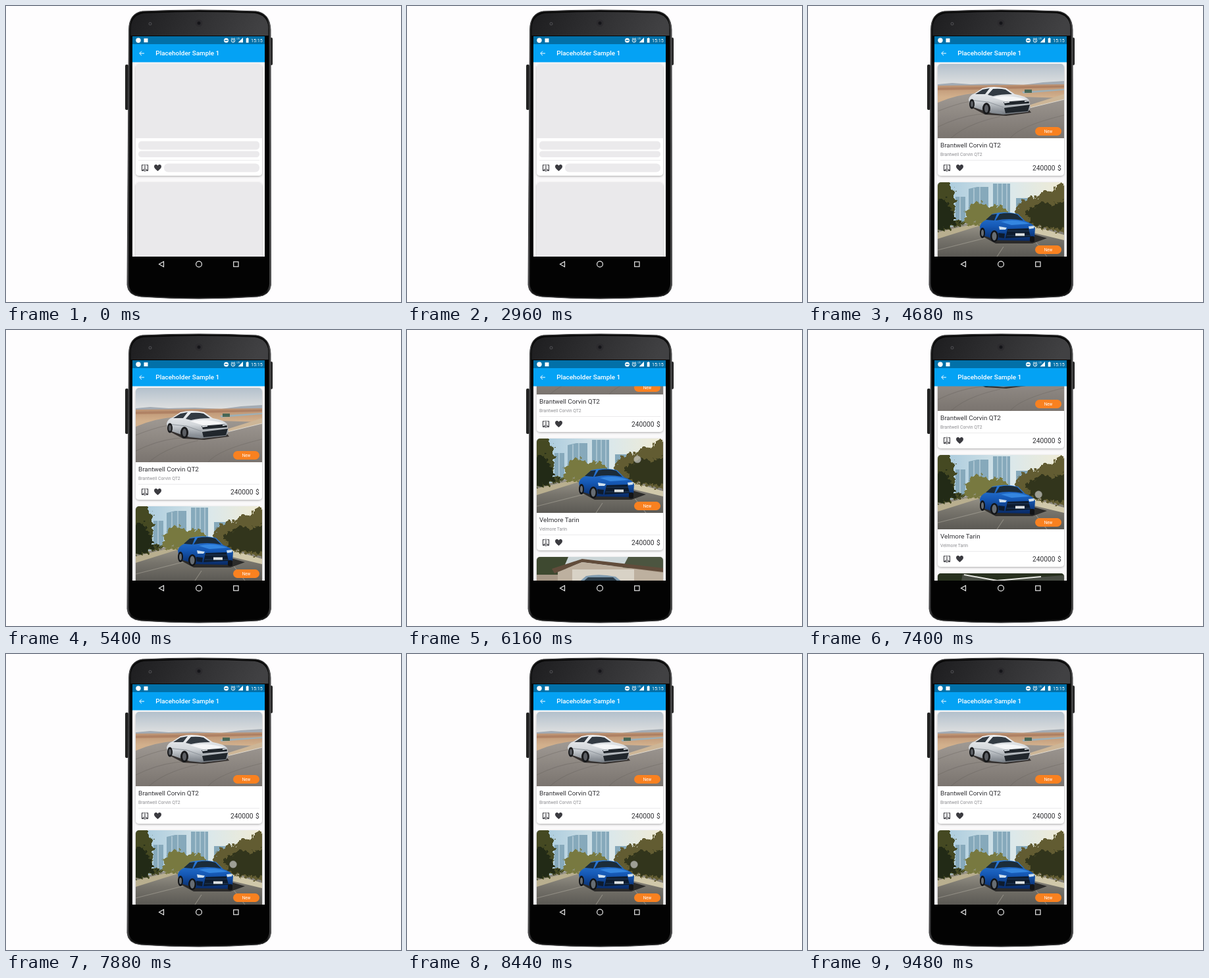
Recreate the animation shown at these times as an HTML page. Size 600 px wide and 450 px high, loop 9.52 s.

```html
<!DOCTYPE html>
<html lang="en">
<head>
<meta charset="utf-8">
<title>Placeholder list</title>
<style>
  html, body { margin: 0; width: 100%; height: 100%; overflow: hidden; background: #fefdfe; }
  svg { display: block; width: 100%; height: 100%; }
  text { font-family: Roboto, sans-serif; }
</style>
</head>
<body>
<svg viewBox="0 0 600 450">
  <defs>
    <linearGradient id="sky" x2="0" y2="1"><stop stop-color="#b3c0cc"/><stop offset="1" stop-color="#e4e4e3"/></linearGradient>
    <linearGradient id="desert" x2="0" y2="1"><stop stop-color="#b98f70"/><stop offset=".5" stop-color="#d2b08c"/></linearGradient>
    <linearGradient id="track" x2="0" y2="1"><stop stop-color="#a09a94"/><stop offset="1" stop-color="#7a746f"/></linearGradient>
    <linearGradient id="silver" x2="0" y2="1"><stop stop-color="#f0f2f4"/><stop offset=".5" stop-color="#d3d7db"/><stop offset="1" stop-color="#747a81"/></linearGradient>
    <linearGradient id="citySky" x2="1" y2="0"><stop stop-color="#a5c8dc"/><stop offset=".6" stop-color="#dce8ea"/><stop offset="1" stop-color="#f0ebd4"/></linearGradient>
    <linearGradient id="street" x2="0" y2="1"><stop stop-color="#a09c90"/><stop offset=".5" stop-color="#77746c"/><stop offset="1" stop-color="#5b5954"/></linearGradient>
    <linearGradient id="blue" x2="0" y2="1"><stop stop-color="#2d7cdb"/><stop offset=".5" stop-color="#1558b4"/><stop offset="1" stop-color="#092a65"/></linearGradient>
    <linearGradient id="metal" x2="1" y2="0"><stop stop-color="#4a4a4c"/><stop offset=".03" stop-color="#111"/><stop offset=".97" stop-color="#111"/><stop offset="1" stop-color="#555"/></linearGradient>
    <linearGradient id="bezel" x2="1" y2=".1"><stop stop-color="#1d1d1f"/><stop offset="1" stop-color="#414143"/></linearGradient>
    <filter id="soft" x="-5%" y="-5%" width="110%" height="115%"><feDropShadow dx="0" dy="1.2" stdDeviation="1.5" flood-opacity=".3"/></filter>
    <filter id="ragged">
      <feTurbulence type="fractalNoise" baseFrequency=".16" numOctaves="3" seed="4"/>
      <feDisplacementMap in="SourceGraphic" scale="14" xChannelSelector="R" yChannelSelector="G"/>
    </filter>
    <clipPath id="screen"><rect x="192" y="46" width="201" height="335"/></clipPath>
    <clipPath id="cardShape"><rect width="192" height="170" rx="5"/></clipPath>
    <clipPath id="photoShape"><rect width="192" height="113"/></clipPath>

    <g id="desertCar">
      <rect width="192" height="36" fill="url(#sky)"/>
      <path d="M0 31L22 29 50 31 90 30 130 32 160 28 192 26V37H0Z" fill="#a3abb4"/>
      <path d="M0 33L192 31V70H0Z" fill="url(#desert)"/>
      <path d="M0 36L60 35 192 33V36L60 39 0 40Z" fill="#a06c50" opacity=".5"/>
      <path d="M128 42L192 38V40L130 45Z" fill="#9db0b8"/>
      <path d="M132 39H143V44H132Z" fill="#476756"/>
      <path d="M0 59Q30 46 64 44L126 50 192 52V113H0Z" fill="url(#track)"/>
      <path d="M138 63L192 46V54L139 67Z" fill="#cdb697"/>
      <path d="M139 67L192 54" stroke="#ded9d0"/>
      <g fill="none" stroke="#66625e" stroke-width="1.2" opacity=".4">
        <path d="M0 72Q30 60 50 57M0 96Q40 76 76 76M20 113Q44 91 95 80M110 113Q125 94 192 78"/>
      </g>
      <path d="M51 66L72 77 104 79 142 74 138 69Z" fill="#34302e"/>
      <path d="M47 54Q49 47 56 45L68 37Q84 33 104 37L117 46Q134 49 139 55L141 67 137 73 100 77 82 75 66 70 49 64Z" fill="url(#silver)"/>
      <path d="M57 46L68 39 79 37 72 46ZM76 47L84 38Q95 37 103 39L113 46Q96 46 84 49Z" fill="#333b43"/>
      <path d="M83 51Q105 46 135 54L103 57Z" fill="#f5f6f7"/>
      <path d="M49 55L77 58 100 66M66 69L98 75" fill="none" stroke="#8d949b"/>
      <path d="M100 58L138 55 139 60 102 63ZM101 67L140 62 137 72 103 75Z" fill="#20262c"/>
      <path d="M101 59L109 58M132 57L138 56" stroke="#edf2f6" stroke-width="1.3"/>
      <g fill="#191a1c"><ellipse cx="74" cy="68" rx="6" ry="9"/><ellipse cx="52" cy="61" rx="4" ry="7.5"/></g>
      <g fill="#5b5e63"><ellipse cx="74" cy="68" rx="3" ry="6"/><ellipse cx="52" cy="61" rx="2" ry="4.5"/></g>
    </g>

    <g id="cityCar">
      <rect width="192" height="113" fill="url(#citySky)"/>
      <path d="M27 22H42V62H27ZM47 10L60 7H77V60H47ZM84 2H110V62H84ZM119 24H142V60H119Z" fill="#86a9bb"/>
      <path d="M34 22V62M55 9V60M64 7V60M91 2V62M98 2V62M105 2V62" stroke="#b5cdd7" stroke-width="1.5"/>
      <path d="M0 72L62 58H144L192 73V113H0Z" fill="url(#street)"/>
      <path d="M0 76L60 62 64 66 0 86Z" fill="#b9af8f"/>
      <path d="M144 66L192 80V88L142 76Z" fill="#d0c8aa"/>
      <path d="M0 103L75 84M90 113L100 98M166 113L149 91" stroke="#b4b0a4" stroke-width="1.2" opacity=".5"/>
      <g filter="url(#ragged)">
        <path d="M38 64L44 42 54 32 68 30 80 38 88 34 98 38 108 46 112 62Z" fill="#78793f"/>
        <path d="M-5 -5H16L25 14 28 38 24 56 44 63 -5 76Z" fill="#454a24"/>
        <path d="M-5 30L12 24 22 48 30 64 -5 74Z" fill="#232b18"/>
        <path d="M112 66L119 38 130 27 139 22 151 24 159 12 174 15 182 4 198 2V78L150 68Z" fill="#625c30"/>
        <path d="M133 45L158 30 175 34 198 26V72L145 65Z" fill="#33361e"/>
      </g>
      <path d="M64 80L88 93 144 93 166 85 142 78Z" fill="#1f1f1f" opacity=".85"/>
      <path d="M64 67Q66 60 74 57L83 48Q101 43 122 48L133 59Q146 63 148 70L147 84 139 89 91 88 66 80Z" fill="url(#blue)"/>
      <path d="M73 57L82 49 90 48 86 58ZM88 58L94 48Q109 45 121 49L130 58Q108 54 88 58Z" fill="#1b2c3a"/>
      <path d="M96 60Q118 55 140 63L112 65Z" fill="#3486e0"/>
      <path d="M93 67L105 69 103 72 94 72ZM138 67L147 66 146 70 139 71Z" fill="#cfe0ee"/>
      <path d="M106 71L138 70 141 83 103 85ZM92 77L102 78 101 85 93 84Z" fill="#0d1b2e"/>
      <path d="M106 74H139M105 81H140" stroke="#33567f" stroke-width=".6"/>
      <rect x="118" y="77.500" width="14" height="4" fill="#dfe3e3"/>
      <g fill="#121417"><ellipse cx="86" cy="82" rx="6" ry="9"/><ellipse cx="68" cy="77" rx="4" ry="8"/><rect x="140" y="82" width="7" height="9" rx="2"/></g>
      <g fill="#676d73"><ellipse cx="86" cy="82" rx="3.500" ry="6.500"/><ellipse cx="68" cy="77" rx="2" ry="5"/></g>
    </g>

    <g id="houseCar">
      <rect width="192" height="113" fill="#a69786"/>
      <path d="M0 0H192V14H0Z" fill="#cbd5d7"/>
      <path d="M0 0H48L42 14 54 27H0Z" fill="#3e4930"/>
      <path d="M139 0H192V17H130Z" fill="#4c5540"/>
      <path d="M23 18L69 3 192 17V23L69 8 27 25Z" fill="#614c3b"/>
      <path d="M32 23L69 8 192 24V51H32Z" fill="#bdb09f"/>
      <path d="M54 19H148V49H54Z" fill="#d8d2c6"/>
      <path d="M0 50H192V113H0Z" fill="#8c8982"/>
      <path d="M37 62L55 46 75 29Q96 25 120 30L141 47 155 54 156 81 142 87H51L37 78Z" fill="#7f9bb0"/>
      <path d="M62 45L78 31H116L132 45Z" fill="#2b3c49"/>
      <path d="M65 61H134V75H65Z" fill="#30373d"/>
      <path d="M42 59H60M139 59H153" stroke="#e7eff4" stroke-width="5"/>
      <path d="M45 80V93M149 80V93" stroke="#171819" stroke-width="11"/>
    </g>
    <g id="shade">
      <rect width="192" height="27" fill="#28311f"/>
      <path d="M38 1L91 10 192 3V27H33Z" fill="#474c43"/>
      <path d="M40 2L90 11 157 5" fill="none" stroke="#e4e5df" stroke-width="2"/>
    </g>

    <g id="icons" fill="#3b3b40">
      <path d="M12.500 153.700H9.500V162.300H12.500M15.700 153.700H18.500V162.300H15.700M14 152.500V164" fill="none" stroke="#3b3b40" stroke-width="1.100"/>
      <path d="M9.500 162.300L12.500 159V162.300ZM15.700 159L18.500 162.300H15.700Z"/>
      <path d="M33.500 163C30 160 28 158.500 28 156 28 152.500 32 152 33.500 154.700 35 152 39 152.500 39 156 39 158.500 37 160 33.500 163Z"/>
    </g>
    <g id="blank">
      <rect width="192" height="113" fill="#eae9eb"/>
      <g fill="#ebeaec">
        <rect x="4" y="117.500" width="184" height="13" rx="5"/>
        <rect x="4" y="132.500" width="184" height="9.500" rx="4.500"/>
        <rect x="43" y="151.500" width="145" height="13" rx="6"/>
      </g>
    </g>
  </defs>

  <rect width="600" height="450" fill="#fefdfe"/>
  <rect x="181" y="89" width="5" height="69" rx="2" fill="#222"/>
  <rect x="401" y="48" width="4" height="42" rx="2" fill="#222"/>
  <path d="M186.500 36Q187 11 207 8 293 4 380 8 401 11 402 36L402.500 424Q401 440 382 442 293 448 205 442 185 440 184 424Z" fill="url(#metal)" stroke="#4b4b4d"/>
  <path d="M188.500 36Q189 13 208 10 293 6 379 10 399 13 399.500 36L400 422Q399 437 381 440 293 445 206 440 187 437 186.500 422Z" fill="#030303"/>
  <path d="M189.500 45V32Q191 14 209 11 293 7 378 11 397 14 398.500 32V45Z" fill="url(#bezel)"/>
  <circle cx="293" cy="26" r="5.500" fill="#2c2b2e"/><circle cx="293" cy="26" r="2.500" fill="#151519"/>
  <circle cx="219" cy="27" r="2.500" fill="#454548"/><circle cx="219" cy="27" r="1" fill="#161618"/>

  <g clip-path="url(#screen)">
    <rect x="192" y="46" width="201" height="335" fill="#faf9fa"/>
    <g id="list"></g>
    <circle id="touch" r="5.500" fill="#e6e6e6" fill-opacity=".6" stroke="#777" stroke-opacity=".4"/>
    <rect x="192" y="58" width="201" height="27.500" fill="#04a2f4"/>
    <rect x="192" y="46" width="201" height="12" fill="#0270a8"/>
    <g fill="#fff">
      <circle cx="201" cy="52.300" r="3.700"/>
      <rect x="209.500" y="49.300" width="6" height="6"/>
      <circle cx="334.500" cy="52.300" r="3.500"/><rect x="332.300" y="51.700" width="4.400" height="1.300" fill="#0270a8"/>
      <path d="M352.500 55.500H360V48ZM364.700 49H366V48.300H367.500V49H368.500V55.700H364.700Z"/>
      <text x="350.500" y="51" font-size="3">LTE</text>
      <text x="372" y="55" font-size="7.200">15:15</text>
      <text x="227.300" y="75.400" font-size="9.940" font-weight="500">Placeholder Sample 1</text>
    </g>
    <g fill="none" stroke="#fff">
      <circle cx="345" cy="52.500" r="2.700"/><path d="M345 50.800V52.700L346.300 53.500M341.800 50L343.500 48.500M348.200 50L346.500 48.500" stroke-width=".8"/>
      <path d="M210 72H203M206 68.700L202.700 72 206 75.300"/>
    </g>
  </g>
  <g fill="none" stroke="#e9e9e9" stroke-width="1.200">
    <path d="M239.500 388.500V396.500L232.500 392.500Z"/><circle cx="293" cy="392.500" r="4.400"/><rect x="345.700" y="388.900" width="7.300" height="7.300"/>
  </g>
</svg>
<script>
const LOOP = 9520, LOADED = 4600, CARD_STEP = 180, REACH = 154;
const list = document.getElementById('list');
const touch = document.getElementById('touch');
const items = [
  ['Brantwell Corvin QT2', 'desertCar'],
  ['Velmore Tarin', 'cityCar'],
  ['Quillon Arven', 'houseCar']
];

const content = ([name, photo]) => `
  <g clip-path="url(#photoShape)"><use href="#${photo}"/>${photo === 'houseCar' ? '<use id="cover" href="#shade"/>' : ''}</g>
  <rect x="148" y="96" width="40" height="13" rx="6.5" fill="#f98120"/>
  <text x="168" y="104.8" font-size="6.3" text-anchor="middle" fill="#fff">New</text>
  <text x="4" y="127.2" font-size="9.9" fill="#303034">${name}</text>
  <text x="4" y="139.8" font-size="6.85" fill="#8e8e92">${name}</text>
  <g font-size="10.2" fill="#303034"><text x="144" y="162">240000</text><text x="187.8" y="162" text-anchor="end">$</text></g>`;

list.innerHTML = items.map((item, i) => `
  <g transform="translate(197 ${88 + i * CARD_STEP})">
    <rect width="192" height="170" rx="5" fill="#fff" filter="url(#soft)"/>
    <g clip-path="url(#cardShape)">
      <use class="blank" href="#blank"/>
      <g class="content">${content(item)}</g>
      <path d="M4 146.5H188" stroke="#e6e5e7" stroke-width=".8"/>
      <use href="#icons"/>
    </g>
  </g>`).join('');

const blanks = list.querySelectorAll('.blank');
const contents = list.querySelectorAll('.content');
const cover = document.getElementById('cover');
const show = (node, on) => node.setAttribute('display', on ? 'inline' : 'none');

function ease(t, start, duration) {
  const p = Math.min(1, Math.max(0, (t - start) / duration));
  return p * p * (3 - 2 * p);
}

function render(t) {
  const loaded = t >= LOADED;
  blanks.forEach(node => show(node, !loaded));
  contents.forEach(node => show(node, loaded));
  show(cover, t >= 6800);

  const scroll = REACH * (ease(t, 5520, 1040) - ease(t, 6904, 1000));
  list.setAttribute('transform', `translate(0 ${-Math.round(scroll)})`);

  // The finger drags the list up, lets go, then pulls it back down.
  const pullingUp = t >= 5560 && t < 6400;
  const pullingDown = t >= 6904 && t < 8480;
  show(touch, pullingUp || pullingDown);
  touch.setAttribute('cx', pullingUp ? 350 : 345 + scroll / 15);
  touch.setAttribute('cy', pullingUp ? 300 - scroll : 320 - scroll * 0.9);
}

function tick() {
  render(performance.now() % LOOP);
  requestAnimationFrame(tick);
}
tick();
</script>
</body>
</html>
```
